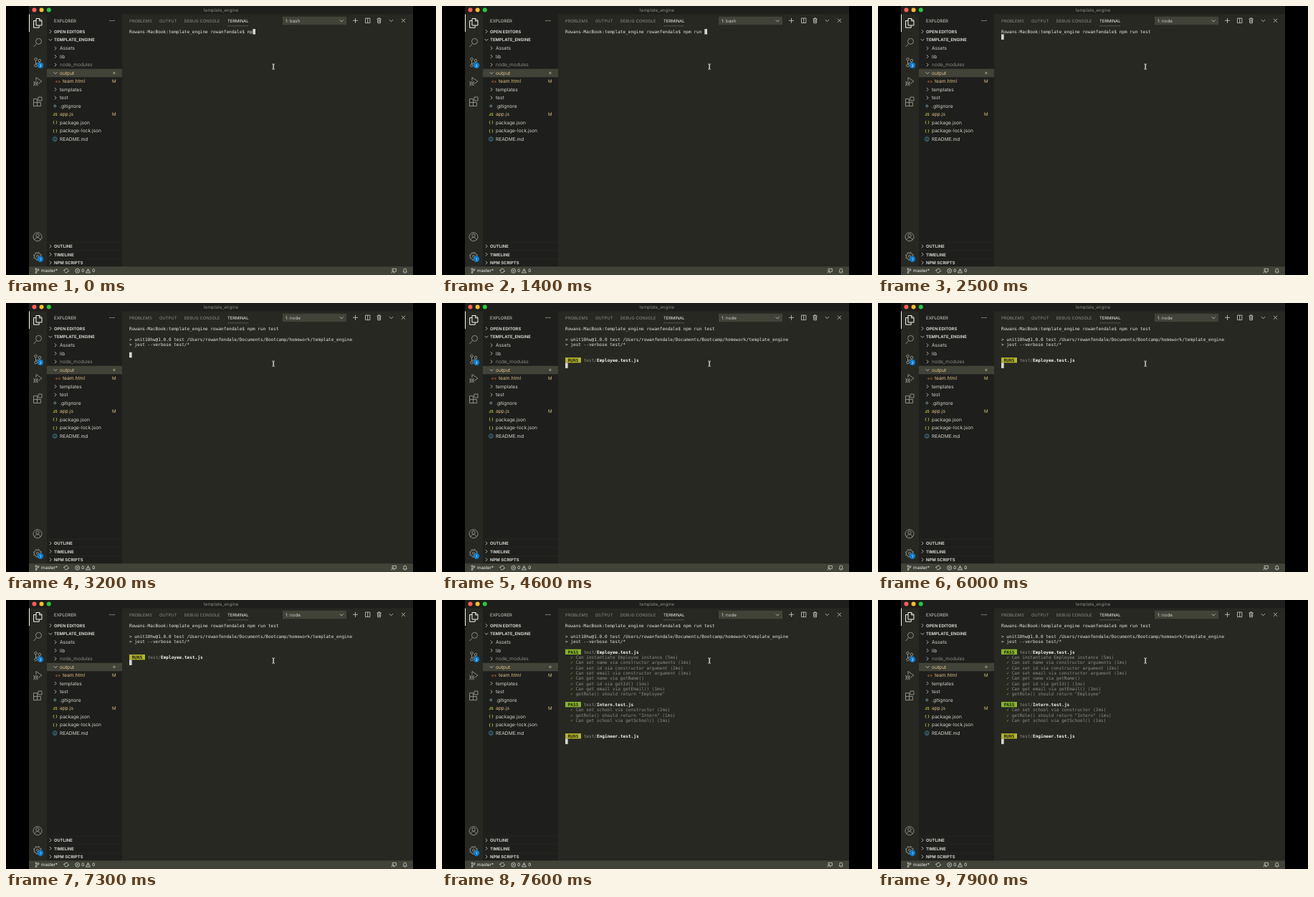
These frames come from a looping animation (600x375 px, 8000 ms). An HTML page:

```html
<!DOCTYPE html>
<html lang="en">
<head>
<meta charset="utf-8">
<title>Terminal test run</title>
<style>
html, body { margin: 0; width: 100%; height: 100%; overflow: hidden; background: #000; }
svg { display: block; width: 600px; height: 375px; }
text { white-space: pre; text-rendering: geometricPrecision; }
.ui { font-family: Inter, "Liberation Sans", sans-serif; font-size: 6.65px; fill: #d2d2cc; }
.small { font-size: 5.85px; }
.head { font-size: 5.9px; font-weight: 700; }
.bar { font-size: 6.2px; }
.mid { text-anchor: middle; }
.dim { fill: #8a8b84; }
.mod { fill: #e0c08a; }
.line { fill: none; stroke: #d0d0ca; stroke-width: .8; }
.act { stroke: #8b8c83; stroke-width: 1; }
.term { font-family: "DejaVu Sans Mono", monospace; font-size: 6.09px; fill: #e6e6e0; }
.term .dim { fill: #8d8e87; }
.term .bold { font-weight: 700; fill: #f4f4ee; }
.term .label { font-weight: 700; fill: #1f2010; }
.term .tick { fill: #86b42b; }
</style>
</head>
<body>
<svg viewBox="0 0 600 375">
  <rect width="600" height="375"/>
  <rect x="32" width="536" height="375" fill="#272822"/>
  <rect x="32" width="536" height="11.5" fill="#1e1f1c"/>
  <rect x="57" y="11.5" width="105" height="352" fill="#1e1f1c"/>
  <rect x="57" y="87.7" width="105" height="11.5" fill="#414339"/>
  <rect x="32" y="363.3" width="536" height="11.7" fill="#414339"/>
  <path d="M57 329.4H162M57 340.9H162M57 352.4H162" stroke="#2c2d28" stroke-width=".5"/>

  <circle cx="39.5" cy="5.5" r="3" fill="#ff5f57"/>
  <circle cx="49.6" cy="5.5" r="3" fill="#febc2e"/>
  <circle cx="59.8" cy="5.5" r="3" fill="#28c840"/>
  <text class="ui mid dim" x="300" y="7.8" style="font-size:6.25px">template_engine</text>

  <!-- activity bar -->
  <rect x="32" y="11.5" width="1" height="24.5" fill="#f8f8f2"/>
  <path class="line" style="stroke:#f4f4ee;stroke-width:1" d="M42 17.5h5l3 3v6.5h-8zM46.6 17.5v3.3h3.4M42 20.5h-3.4v9.7h7.6v-3"/>
  <g class="line act">
    <path d="M42.5 52.7l-4 4.3"/><circle cx="45.5" cy="49.3" r="4"/>
    <circle cx="41.5" cy="74" r="1.8"/><circle cx="47" cy="76" r="1.8"/><circle cx="41.5" cy="83" r="1.8"/>
    <path d="M41.5 75.8v5.4M47 77.8c0 2.5-5.5 1-5.5 3.4"/>
    <path d="M42 104v-4.5l8 5.5-5 3.5"/><circle cx="41.5" cy="108" r="2.3"/><path d="M38 105.5l1.7 1M38 111l1.7-1M45 105.5l-1.7 1M45 111l-1.7-1M39 108h5"/>
    <path d="M38.5 129.5h5v10h-5zM38.5 134.5h10v5h-10zM45 127h5v5h-5z"/>
    <circle cx="44" cy="321.8" r="6"/><circle cx="44" cy="320" r="2.2"/><path d="M40 326c1-4.5 7-4.5 8 0"/>
    <circle cx="44" cy="348.8" r="4.5"/><circle cx="44" cy="348.8" r="1.6"/>
    <circle cx="44" cy="348.8" r="5.5" stroke-dasharray="2.2 2.12"/>
  </g>
  <circle cx="48" cy="82.8" r="4.2" fill="#0e7acb"/><text class="ui mid" x="48" y="84.6" style="font-size:5px;fill:#fff">3</text>
  <circle cx="48" cy="352.8" r="4.2" fill="#0e7acb"/><text class="ui mid" x="48" y="354.6" style="font-size:5px;fill:#fff">1</text>

  <!-- explorer -->
  <text class="ui small" x="67" y="22.9" style="font-size:6.05px">EXPLORER</text>
  <g fill="#d0d0ca"><circle cx="145.2" cy="20.5" r=".65"/><circle cx="148" cy="20.5" r=".65"/><circle cx="150.8" cy="20.5" r=".65"/></g>
  <g id="tree"></g>

  <!-- panel header -->
  <g class="ui small">
    <text class="dim" x="172" y="22.9">PROBLEMS</text>
    <text class="dim" x="214" y="22.9">OUTPUT</text>
    <text class="dim" x="248.5" y="22.9">DEBUG CONSOLE</text>
    <text x="309" y="22.9" style="fill:#f4f4ee">TERMINAL</text>
  </g>
  <rect x="309" y="27.6" width="29" height=".6" fill="#75715e"/>
  <rect x="386" y="14.8" width="89" height="11.4" fill="#414339"/>
  <text id="shell" class="ui bar" x="390" y="22.8"></text>
  <g class="line">
    <path d="M465.8 19.5l2.4 2.4 2.4-2.4"/>
    <path d="M484 20.3h7M487.5 16.8v7"/>
    <path d="M501.5 17h6.4v6.6h-6.4zM504.7 17v6.6"/>
    <path d="M517.6 18h6M519.6 18v-1.2h2V18M518.4 18l.4 5.8h3.6l.4-5.8M520 19.5v3M521.3 19.5v3"/>
    <path d="M534.8 19.2l2.6 2.4 2.6-2.4"/>
    <path d="M552 17.8l5 5M557 17.8l-5 5"/>
  </g>

  <!-- status bar -->
  <g class="ui bar" style="fill:#f0f0ea">
    <text x="49" y="371.4">master*</text><text x="105.3" y="371.4">0</text><text x="120.2" y="371.4">0</text>
  </g>
  <g class="line">
    <circle cx="42" cy="366.7" r="1"/><circle cx="45" cy="367.6" r="1"/><circle cx="42" cy="371.6" r="1"/><path d="M42 367.7v2.9M45 368.6c0 1.5-3 .8-3 2"/>
    <path d="M81.2 369a3 3 0 0 1 5.4-1.5M87 369a3 3 0 0 1-5.4 1.5M80.2 368l1 1.2 1.2-1M88 370l-1-1.2-1.2 1"/>
    <circle cx="99.7" cy="369.2" r="3"/><path d="M98.4 367.9l2.6 2.6M101 367.9l-2.6 2.6"/>
    <path d="M114.5 366.2l3.1 5.7h-6.2zM114.5 368.2v1.8M114.5 370.6v.6"/>
    <path d="M539 367.5v-1.2h5.4v4h-1.6l-1.4 1.4v-1.4"/><circle cx="539.8" cy="369.2" r="1.1"/><path d="M537.8 372.4c.3-2.4 3.7-2.4 4 0"/>
    <path d="M554 371h5.4l-.8-1.4v-1.6a1.9 1.9 0 0 0-3.8 0v1.6zM556 372.2h1.4"/>
  </g>

  <g id="term" class="term"></g>
  <rect id="caret" width="3.67" height="7.5" fill="#d6d6d0"/>

  <!-- mouse pointer -->
  <g fill="none">
    <path id="beam" d="M371.3 81h1q.8 0 .8.8v5.6q0 .8-.8.8h-1M375 81h-1q-.8 0-.8.8v5.6q0 .8.8.8h1" stroke="#e4e4de" stroke-width=".9"/>
  </g>
</svg>
<script>
const LOOP = 8000, COL = 3.667, ROW = 7.333, LEFT = 172, TOP = 32;
const $ = id => document.getElementById(id);

const text = (x, y, s, cls = '') => `<text class="${cls}" x="${x}" y="${y}">${s}</text>`;
const chevron = (x, y, open) => `<path class="line" d="${open
  ? `M${x - 2.4} ${y - 1.1}l2.4 2.4 2.4-2.4` : `M${x - 1.2} ${y - 2.4}l2.4 2.4-2.4 2.4`}"/>`;

function drawTree() {
  const heads = [[35.5, 'OPEN EDITORS'], [47, 'TEMPLATE_ENGINE', true],
    [334.9, 'OUTLINE'], [346.3, 'TIMELINE'], [357.8, 'NPM SCRIPTS']];
  const items = [
    ['Assets', 'dir'], ['lib', 'dir'], ['node_modules', 'dir', 'dim'], ['output', 'open', 'mod'],
    ['team.html', '&lt;&gt;', 'mod', '#d97a3a'], ['templates', 'dir'], ['test', 'dir'],
    ['.gitignore', 'git'], ['app.js', 'JS', 'mod', '#cbcb41'],
    ['package.json', '{ }', '', '#cbcb41'], ['package-lock.json', '{ }', '', '#cbcb41'],
    ['README.md', 'info']];
  let out = heads.map(([y, s, open]) => chevron(62, y, open) + text(67, y + 2.2, s, 'ui head')).join('');
  items.forEach(([name, icon, cls = '', color], i) => {
    const y = 58.8 + i * 11.52, child = name === 'team.html', x = child ? 72.5 : 68.5;
    out += text(child ? 79 : 75, y + 2.4, name, 'ui ' + cls);
    if (icon === 'dir' || icon === 'open') out += chevron(69, y, icon === 'open');
    else if (icon === 'git') out += `<path d="M68.3 ${y - 2.6}l2.6 2.6-2.6 2.6-2.6-2.6z" fill="#50626c"/>`;
    else if (icon === 'info') out += `<circle class="line" style="stroke:#519aba" cx="68.3" cy="${y}" r="2.8"/>
      <path d="M68.3 ${y - .5}v2.2M68.3 ${y - 1.8}v.7" stroke="#519aba" stroke-width=".8"/>`;
    else out += `<text class="ui mid" x="${x}" y="${y + 2}" style="font-size:5.4px;font-weight:600;fill:${color}">${icon}</text>`;
    if (color && cls) out += text(150.7, y + 2.3, 'M', 'ui bar mid mod');
    if (icon === 'open') out += `<circle cx="150.9" cy="${y}" r="1.8" fill="#8a7d61"/>`;
  });
  $('tree').innerHTML = out;
}

const put = (col, row, s, cls) =>
  text((LEFT + col * COL).toFixed(2), (TOP + 5.9 + row * ROW).toFixed(2), s, cls);

function badge(row, label, file) {
  const color = label === 'PASS' ? '#86b42b' : '#b3b42b';
  return `<rect x="${LEFT}" y="${TOP + row * ROW}" width="${6 * COL}" height="${ROW}" fill="${color}"/>`
    + put(1, row, label, 'label') + put(7, row, 'test/', 'dim') + put(12, row, file + '.test.js', 'bold');
}

const suite = (row, file, tests) => badge(row, 'PASS', file)
  + tests.map((s, i) => put(2, row + 1 + i, '✓', 'tick') + put(4, row + 1 + i, s, 'dim')).join('');

const PROMPT = 'Rowans-MacBook:template_engine rowanfendale$ ';
const COMMAND = 'npm run test';
const KEYS = [0, 0, 100, 200, 900, 900, 1100, 1200, 1600, 1700, 1900, 2200];

const banner = put(0, 2, '&gt; unit10hw@1.0.0 test /Users/rowanfendale/Documents/Bootcamp/homework/template_engine')
  + put(0, 3, '&gt; jest --verbose test/*');
const employee = suite(5, 'Employee', [
  'Can instantiate Employee instance (5ms)', 'Can set name via constructor arguments (1ms)',
  'Can set id via constructor argument (2ms)', 'Can set email via constructor argument (1ms)',
  'Can get name via getName()', 'Can get id via getId() (1ms)',
  'Can get email via getEmail() (1ms)', 'getRole() should return "Employee"']);
const intern = suite(15, 'Intern', [
  'Can set school via constructor (2ms)', 'getRole() should return "Intern" (1ms)',
  'Can get school via getSchool() (1ms)']);

// [start, output, caret row]
const STAGES = [
  [2500, '', 1],
  [3200, banner, 5],
  [4600, banner + badge(6, 'RUNS', 'Employee'), 7],
  [7500, banner + employee + badge(16, 'RUNS', 'Intern'), 17],
  [7600, banner + employee + intern + badge(21, 'RUNS', 'Engineer'), 22]];

let shown = '';
function draw() {
  const t = performance.now() % LOOP;
  const typed = KEYS.filter(k => k <= t).length;
  const stage = STAGES.filter(s => s[0] <= t).pop();
  const key = [typed, stage && stage[0], t >= 2500].join();
  if (key !== shown) {
    shown = key;
    $('term').innerHTML = put(0, 0, PROMPT + COMMAND.slice(0, typed)) + (stage ? stage[1] : '');
    $('caret').setAttribute('x', LEFT + (stage ? 0 : PROMPT.length + typed) * COL);
    $('caret').setAttribute('y', TOP + (stage ? stage[2] * ROW : 0));
    $('shell').textContent = stage ? '1: node' : '1: bash';
  }
  requestAnimationFrame(draw);
}

drawTree();
draw();
</script>
</body>
</html>
```
